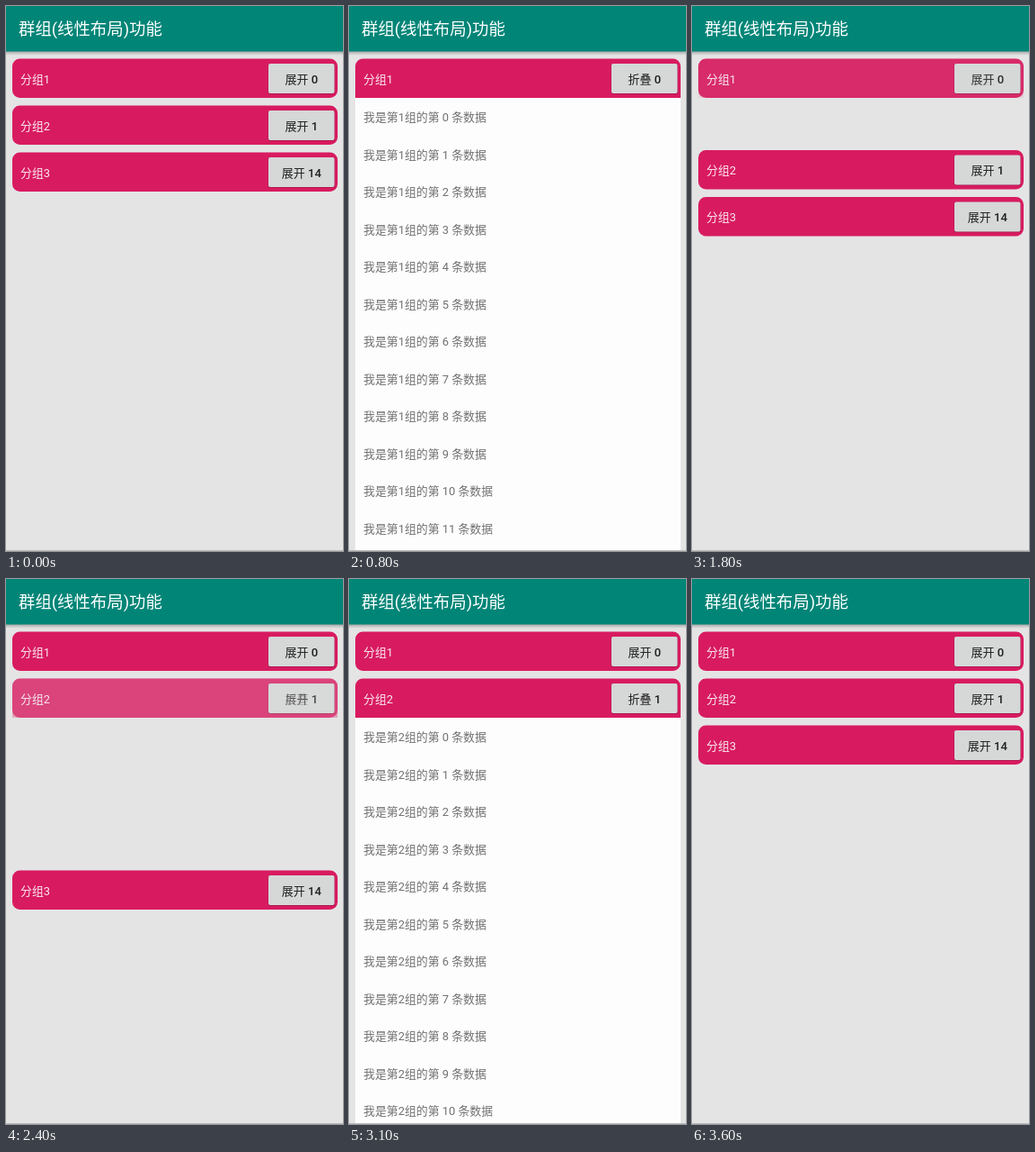
Write an HTML page that moves like this. It is 375x605 px and loops after 3700 ms.

```html
<!DOCTYPE html>
<html lang="zh-CN">
<head>
<meta charset="utf-8">
<title>群组功能</title>
<style>
  html, body { margin: 0; width: 100%; height: 100%; overflow: hidden; background: #e4e4e4; }
  svg { display: block; width: 100vw; height: 100vh; }
  text { font: 12.9px Roboto, "Noto Sans CJK SC", "Noto Sans CJK JP", sans-serif; }
  .title { font-size: 18.4px; fill: #fff; }
  .name { fill: #fbeaf1; }
  .label { font-size: 13px; fill: #1f1f1f; text-anchor: middle; }
  .label tspan { font-weight: 500; }
  .row { fill: #717171; }
</style>
</head>
<body>
<svg id="stage" viewBox="0 0 375 605">
  <defs>
    <linearGradient id="drop" x2="0" y2="1">
      <stop offset="0" stop-opacity=".28"/>
      <stop offset="1" stop-opacity="0"/>
    </linearGradient>
    <filter id="soft" x="-20%" y="-40%" width="140%" height="180%">
      <feGaussianBlur stdDeviation="1.6"/>
    </filter>
  </defs>
  <rect width="375" height="605" fill="#e4e4e4"/>
  <g id="list"></g>
  <rect y="50" width="375" height="5" fill="url(#drop)"/>
  <rect width="375" height="50.5" fill="#008577"/>
  <text class="title" x="14" y="31.6">群组(线性布局)功能</text>
  <rect y="604" width="375" height="1" fill="#bdbdbd"/>
</svg>
<script>
const LOOP = 3700;
const TOP = 58.5, PITCH = 52, HEAD = 43.5;
const ROW = 41.5, ROWS = 13, SPREAD = ROW * ROWS;
const MOVE = 250, FADE = 120;

// press: button held; grow: rows make room; fade: rows vanish; shrink: gap closes
const GROUPS = [
  { tag: 0, grow: 416, fade: 1465, shrink: 1600, press: [[310, 490], [1420, 1590]] },
  { tag: 1, grow: 2309, fade: 3170, shrink: 3300, press: [[2130, 2300], [3120, 3290]] },
  { tag: 14, press: [] }
];

const list = document.getElementById('list');

function add(parent, name, attrs, text) {
  const el = document.createElementNS('http://www.w3.org/2000/svg', name);
  for (const key in attrs) el.setAttribute(key, attrs[key]);
  if (text) el.textContent = text;
  parent.appendChild(el);
  return el;
}

function addHeader(parent, index, tag, open) {
  const g = add(parent, 'g', {});
  const shape = open
    ? `M7 ${HEAD}V8.5a8.5 8.5 0 0 1 8.5-8.5H360.5a8.5 8.5 0 0 1 8.5 8.5V${HEAD}z`
    : `M15.5 0H360.5a8.5 8.5 0 0 1 8.5 8.5V35a8.5 8.5 0 0 1-8.5 8.5H15.5a8.5 8.5 0 0 1-8.5-8.5V8.5a8.5 8.5 0 0 1 8.5-8.5z`;
  add(g, 'path', { d: shape, fill: '#d81b60' });
  add(g, 'text', { class: 'name', x: 16, y: 27 }, '分组' + (index + 1));
  const shadow = add(g, 'rect', { x: 291.5, y: 7, width: 75, height: 34, rx: 2, filter: 'url(#soft)', opacity: 0 });
  add(g, 'rect', { x: 291.7, y: 5.8, width: 74.2, height: 33.5, rx: 2, opacity: .25 });
  add(g, 'rect', { x: 292, y: 5.5, width: 73.5, height: 33, rx: 2, fill: '#d6d7d7' });
  const label = add(g, 'text', { class: 'label', x: 328.8, y: 27 }, open ? '折叠 ' : '展开 ');
  add(label, 'tspan', {}, String(tag));
  return { g, shadow };
}

function addRows(parent, index) {
  const g = add(parent, 'g', {});
  add(g, 'rect', { x: 7, y: HEAD, width: 362, height: SPREAD, fill: '#fdfdfd' });
  for (let i = 0; i < ROWS; i++) {
    add(g, 'text', { class: 'row', x: 16, y: HEAD + 26.3 + i * ROW }, `我是第${index + 1}组的第 ${i} 条数据`);
  }
  return g;
}

const views = GROUPS.map((group, i) => {
  const root = add(list, 'g', {});
  const view = { root, closed: addHeader(root, i, group.tag, false) };
  if (group.grow) {
    view.open = addHeader(root, i, group.tag, true);
    view.rows = addRows(root, i);
  }
  return view;
});

const clamp = v => Math.max(0, Math.min(1, v));
const ease = (t, start, span) => (1 - Math.cos(Math.PI * clamp((t - start) / span))) / 2;

function pressure(t, spans) {
  return Math.max(0, ...spans.map(([a, b]) => clamp((t - a) / 60) * clamp((b - t) / 60)));
}

function show(el, alpha) {
  el.setAttribute('opacity', alpha);
  el.setAttribute('display', alpha > 0 ? 'inline' : 'none');
}

function render(t) {
  let y = TOP;
  GROUPS.forEach((group, i) => {
    const view = views[i];
    const shade = .5 * pressure(t, group.press);
    view.root.setAttribute('transform', `translate(0 ${y})`);
    view.closed.shadow.setAttribute('opacity', shade);
    y += PITCH;
    if (!view.open) return;
    const opened = ease(t, group.grow, MOVE) - ease(t, group.shrink, MOVE);
    const rows = ease(t, group.grow + MOVE, FADE) - ease(t, group.fade, FADE);
    view.open.shadow.setAttribute('opacity', shade);
    show(view.closed.g, 1 - opened);
    show(view.open.g, opened);
    show(view.rows, rows);
    y += SPREAD * opened;
  });
}

const begin = performance.now();
function tick() {
  render((performance.now() - begin) % LOOP);
  requestAnimationFrame(tick);
}
render(0);
requestAnimationFrame(tick);
</script>
</body>
</html>
```
